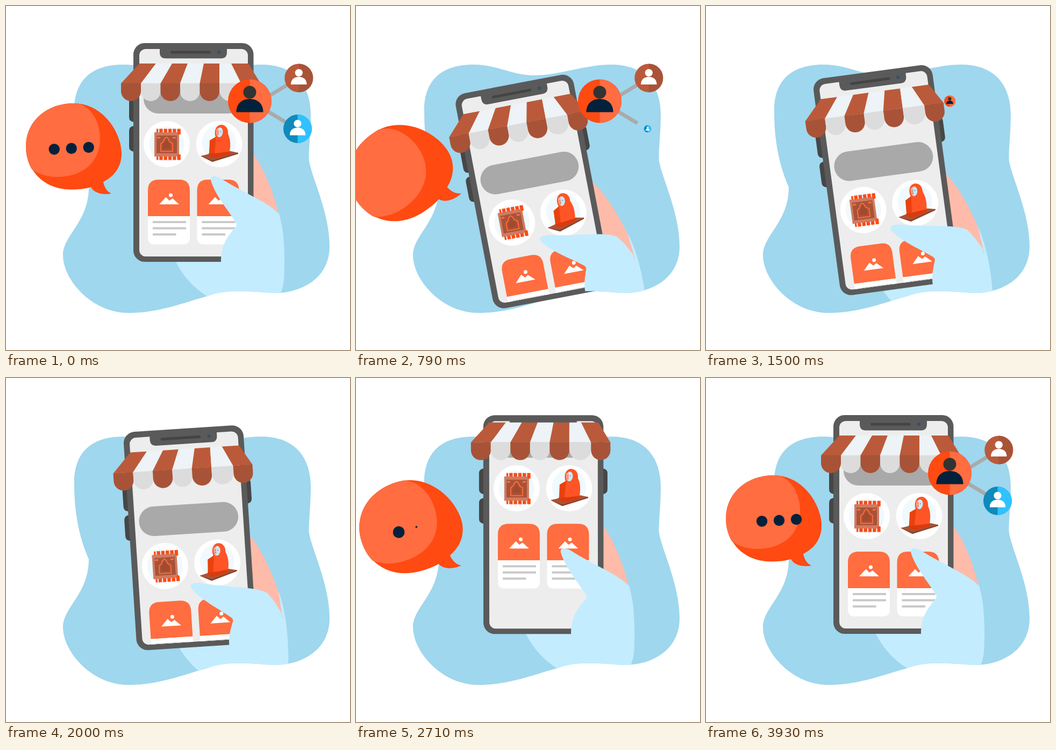
An HTML page that plays this animation: 640x640 px, repeating every 4780 ms.

```html
<!DOCTYPE html>
<html lang="en">
<head>
<meta charset="utf-8">
<title>Mobile shop</title>
<style>
  html, body { margin: 0; width: 100%; height: 100%; overflow: hidden; background: #fff; }
  svg { display: block; width: 100vw; height: 100vh; }
</style>
</head>
<body>
<svg viewBox="0 0 640 640">
  <defs>
    <path id="blob" d="M127 200C125 150 148 109 218 109C262 109 290 129 330 129C380 129 425 109 475 109C535 109 567 145 567 203C567 240 562 275 564 289C570 322 602 385 602 447C602 508 548 534 500 534C465 533 415 524 374 540C330 552 285 571 228 571C158 571 106 508 106 464C106 426 154 402 154 337C136 297 127 250 127 200Z"/>
    <clipPath id="inBlob"><use href="#blob"/></clipPath>
    <clipPath id="inScreen"><rect x="248" y="80" width="202" height="386" rx="12"/></clipPath>
    <g id="person">
      <circle cy="-16.5" r="12" fill="var(--head)"/>
      <path d="M-25 20.5C-25 4 -14 -4 0 -4S25 4 25 20.5Z" fill="var(--torso)"/>
    </g>
    <g id="card">
      <path d="M264 391V343Q264 323 284 323H322Q342 323 342 343V391Z" fill="#ff6d40"/>
      <path d="M264 391H342V431Q342 443.500 329.500 443.500H276.500Q264 443.500 264 431Z" fill="#fff"/>
      <path d="M285 369L297.500 355.500L304 362L310 358L322 369Z" fill="#fff"/>
      <circle cx="306.500" cy="352" r="3.500" fill="#fff"/>
      <path d="M273 402H335M273 413.500H335M273 425H316.500" stroke="#c9c9c9" stroke-width="4"/>
    </g>
  </defs>

  <use href="#blob" fill="#9fd7ee"/>

  <g clip-path="url(#inBlob)"><g class="rig">
    <path d="M316 476Q336 516 374 540L400 556H495Q517 538 517.500 500C520 450 515 412 508 386L480 330L400 400Z" fill="#c3ecff"/>
    <path d="M440 260L460 275C482 305 498 350 507 386L511 432L480 445L440 400Z" fill="#ffbbaa"/>
  </g></g>

  <g class="rig">
    <path d="M238 168Q229 169 229 177V207Q229 215 238 216ZM238 223Q229 224 229 232V262Q229 270 238 271ZM459 168Q468 169 468 177V207Q468 215 459 216Z" fill="#464646"/>
    <rect x="237" y="69" width="223.500" height="407" rx="21" fill="#5a5a5a"/>
    <rect x="248" y="80" width="202" height="386" rx="12" fill="#ededed"/>
    <path d="M286 79V86Q286 97.500 297 97.500H400Q411 97.500 411 86V79Z" fill="#5a5a5a"/>
    <rect x="306" y="83.500" width="75" height="5" rx="2.500" fill="#444"/>
    <circle cx="396" cy="86" r="3" fill="#34506b"/>
    <g clip-path="url(#inScreen)"><g id="content">
      <rect x="256" y="145" width="185" height="55" rx="27.500" fill="#a9a9a9"/>
      <g fill="#fff"><circle cx="299" cy="257" r="43"/><circle cx="396.500" cy="257" r="43"/></g>
      <g fill="#f0f9fe"><circle cx="299" cy="257" r="33"/><circle cx="396.500" cy="254" r="32"/></g>
      <path d="M280 233H325M280 282H325" stroke="#ff4a12" stroke-width="9" stroke-dasharray="6.300 2" stroke-dashoffset="3"/>
      <rect x="276" y="235" width="46" height="45" fill="#cf7b62"/>
      <rect x="280" y="241" width="38" height="33" fill="#a85338"/>
      <path d="M288 270.500V256L293 252Q294 246 298.500 244Q303 246 304 252L310 256V270.500Z" fill="#ae512f" stroke="#ff6d40" stroke-width="1.800"/>
      <path d="M292 266V258L298.500 248L306 258V266Z" fill="#a04b31"/>
      <path d="M282 245h4M311 245h4" stroke="#ff6d40" stroke-width="3" stroke-linecap="round"/>
      <path d="M322 235V239M322 276V280" stroke="#ff4a12" stroke-width="5"/>
      <path d="M362 279L408 268L432 273V275L384 290Z" fill="#a85338"/>
      <path d="M362 279L384 287L432 273V275L384 290Z" fill="#8b432d"/>
      <path d="M377 274L390 270L416 270Q418 276 410 278L388 283Q377 281 377 274Z" fill="#d83b0d"/>
      <path d="M389 240C387 225 396 220 402 221C410 222 414 230 413 238C418 248 418 260 416 271L390 274L378 273L380 250L390 244Z" fill="#ff5426"/>
      <path d="M379 250L391 243L388 274L378 275Z" fill="#e9420f"/>
      <ellipse cx="397.500" cy="235" rx="6" ry="9" fill="#c5eaf8" transform="rotate(8 397.500 235)"/>
      <path d="M392 228Q398 229 396 234Q398 240 393 243Q390 236 392 228Z" fill="#ffab98"/>
      <path d="M393 234h2M398 234h2M393 238h2" stroke="#45637a"/>
      <use href="#card"/><use href="#card" x="91.500"/>
    </g></g>
    <g id="awning"></g>
  </g>

  <g clip-path="url(#inBlob)"><g class="rig">
    <path id="thumb" d="M381 324C379 316 388 314 400 321C440 347 494 368 507 387Q514 405 516.500 432L500 485H400V476C400 445 411 430 428 410Q430 406 427 402C412 378 388 350 381 324Z" fill="#c3ecff"/>
  </g></g>

  <g stroke="#aaa" stroke-width="7">
    <path id="lineTop" pathLength="1" d="M453.500 189L524.500 146"/>
    <path id="lineLow" pathLength="1" d="M453.500 176L523.500 218"/>
  </g>
  <g id="icons"></g>

  <g id="bubble">
    <path d="M126 181C180 181 215 235 215 275C215 300 200 318 181 327C183 338 188 345 196 349C180 352 164 348 158 337Q143 341.500 121 341.500C65 341 37 300 37 261C37 215 75 181 126 181Z" fill="#ff4a12"/>
    <path d="M133 181C158 187 175 215 175 247C175 290 143 318 95 318C75 318 58 311 48 304C40 290 37 276 37 261C37 215 75 181 126 181Z" fill="#ff6d40"/>
    <g id="dots" fill="#04213b"><circle cx="104" cy="266.500"/><circle cx="136" cy="265"/><circle cx="168" cy="263"/></g>
  </g>
</svg>
<script>
const LOOP = 4780, FPS = 14, LAST = 55;
const $ = id => document.getElementById(id);
const move = (el, value) => el.setAttribute('transform', value);

// Awning: seven slanted stripes, each ending in a scallop
const topX = [248, 279, 309, 338, 368, 397, 419, 451];
const lowX = [214, 251, 287.5, 324, 360.5, 397, 437.5, 473.5];
$('awning').innerHTML = topX.slice(1).map((_, i) => {
  const a = lowX[i], b = lowX[i + 1], r = (b - a) / 2;
  const [slope, scallop] = i % 2 ? ['#edf3f6', '#dcdcdc'] : ['#bb5a3a', '#a85338'];
  return `<path d="M${topX[i]} 107H${topX[i + 1]}L${b} 144H${a}Z" fill="${slope}"/>
    <path d="M${a} 143.800H${b}V${177 - r}A${r} ${r} 0 0 1 ${a} ${177 - r}Z" fill="${scallop}"/>`;
}).join('');

// Share badges; size keys are [step, value, step, value, ...]
const badges = [
  { x: 542.5, y: 228.5, r: 26.5, left: '#0f8aba', right: '#2fc2ff', size: [6, 1, 13.5, 0, 47.5, 0, 53, 1] },
  { x: 544.8, y: 134, r: 26.5, left: '#ba5a3c', right: '#a85338', size: [11, 1, 18.5, 0, 44.7, 0, 49.7, 1] },
  { x: 453.5, y: 177, r: 40.5, left: '#ff4a12', right: '#ff6d40', size: [16, 1, 23.5, 0, 38.5, 0, 44, 1], main: true },
];
$('icons').innerHTML = badges.map(({ r, left, right, main }) => `<g>
  <circle r="${r}" fill="${left}"/><path d="M0 ${-r}A${r} ${r} 0 0 1 0 ${r}Z" fill="${right}"/>
  <use href="#person" transform="scale(${main ? 1 : 0.59})"
    style="--head:${main ? '#333' : '#fff'};--torso:${main ? '#04213b' : '#fff'}"/></g>`).join('');

// Smooth interpolation through the keys
function track(k, keys) {
  if (k <= keys[0]) return keys[1];
  for (let i = 2; i < keys.length; i += 2) {
    if (k < keys[i]) {
      const u = (k - keys[i - 2]) / (keys[i] - keys[i - 2]);
      return keys[i - 1] + (keys[i + 1] - keys[i - 1]) * u * u * (3 - 2 * u);
    }
  }
  return keys[keys.length - 1];
}

function draw(k) {
  const tilt = track(k, [0, 0, 11, 1, 39, 0]);
  for (const el of document.querySelectorAll('.rig'))
    move(el, `translate(${-19 * tilt} ${72.6 * tilt}) rotate(${-10.8 * tilt} 348.5 272.5)`);
  move($('thumb'), `rotate(${track(k, [0, 0, 11, -19.5, 28, -19.5, 38, 0])} 488 448)`);
  move($('content'), `translate(0 ${track(k, [0, 0, 11, 65, 28, 65, 38, -52, 49, 0])})`);
  move($('awning'), `translate(0 ${track(k, [28, 0, 38, -24.5, 50, 0])})`);

  const turn = track(k, [0, 0, 11, -32, 32, -32, 43, 0]);
  const size = track(k, [0, 1, 11, 1.085, 16, 0, 28, 0, 33, 1.12, 44, 1]);
  move($('bubble'), `translate(195.5 349) rotate(${turn}) scale(${size}) translate(-195.5 -349)`);
  move($('dots'), `translate(${k < 20 ? -14.3 : 0} 0)`);
  [...$('dots').children].forEach((dot, i) => {
    const start = 30.8 + 5.35 * i;
    dot.setAttribute('r', 10.2 * track(k, [5 - 2 * i, 1, 10 - 2 * i, 0, start, 0, start + 7, 1]));
  });

  badges.forEach(({ x, y, size }, i) =>
    move($('icons').children[i], `translate(${x} ${y}) scale(${track(k, size)})`));
  const grow = (id, keys) => $(id).setAttribute('stroke-dasharray', `${track(k, keys)} 2`);
  grow('lineLow', [11, 1, 16, 0, 50, 0, 54, 1]);
  grow('lineTop', [14, 1, 19, 0, 47, 0, 51, 1]);
}

const begin = performance.now();
function tick() {
  const t = (performance.now() - begin) % LOOP;
  draw(Math.min(LAST, Math.floor((t + 5) * FPS / 1000)));
  requestAnimationFrame(tick);
}
tick();
</script>
</body>
</html>
```
